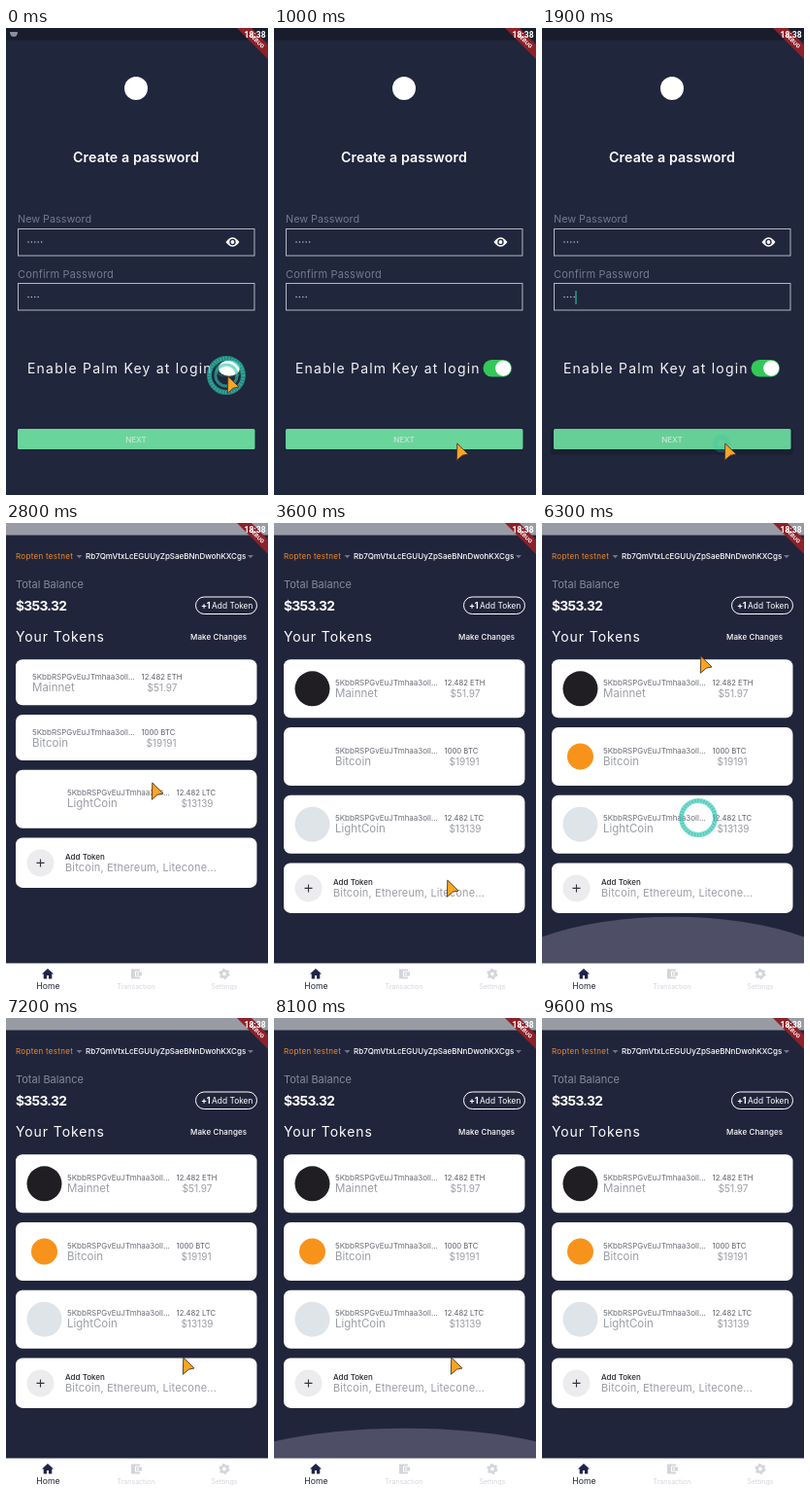
Write an HTML page that moves like this. It is 270 by 480 pixels and loops after 10000 ms.

```html
<!DOCTYPE html>
<html lang="en">
<head>
<meta charset="utf-8">
<title>Wallet demo</title>
<style>
html, body { margin: 0; width: 100%; height: 100%; overflow: hidden; background: #20253b; }
svg { display: block; width: 100vw; height: 100vh; }
text { font-family: Inter, "Open Sans", sans-serif; white-space: pre; }
</style>
</head>
<body>
<svg id="stage" viewBox="0 0 270 480"></svg>
<script>
const LOOP = 10000, STEP = 100;
const GREY = '#9c9ea6', INK = '#24283b', PALE = '#d3d5db';
const stage = document.getElementById('stage');

const text = (x, y, size, fill, str, extra = '') =>
  `<text x="${x}" y="${y}" font-size="${size}" fill="${fill}" ${extra}>${str}</text>`;
const rect = (x, y, w, h, fill, extra = '') =>
  `<rect x="${x}" y="${y}" width="${w}" height="${h}" fill="${fill}" ${extra}/>`;
const circle = (x, y, r, fill, extra = '') =>
  `<circle cx="${x}" cy="${y}" r="${r}" fill="${fill}" ${extra}/>`;
const path = (d, fill, extra = '') => `<path d="${d}" fill="${fill}" ${extra}/>`;
const dots = (n, y) =>
  Array.from({ length: n }, (_, i) => circle(23 + i * 3.4, y, .75, '#c3c6cf')).join('');
const field = y => rect(12.5, y + .5, 243.5, 27.5, 'none', 'stroke="#b4b8c3"');
const middle = 'text-anchor="middle" ';
const spacing = n => `letter-spacing="${n}" `;
const weight = n => `font-weight="${n}" `;

const loginPage = `
  ${rect(0, 0, 270, 480, '#20263c')}
  ${circle(134, 62, 12, '#fff')}
  ${text(134, 138, 14.2, '#fff', 'Create a password', middle + weight(600) + spacing(.1))}
  ${text(12, 200, 10.8, '#747990', 'New Password')}
  ${text(12, 257, 11, '#747990', 'Confirm Password', spacing(.2))}
  ${field(206)}${field(262)}${dots(5, 220)}${dots(4, 276.5)}
  ${path('M226.5 220Q233.5 210.5 240.5 220Q233.5 229.5 226.5 220Z', '#fff')}
  ${circle(233.5, 220, 3.2, '#20263c')}${circle(233.5, 220, 1.9, '#fff')}
  ${rect(34.3, 270, 1.4, 14, '#1fa890', 'id="caret"')}
  ${text(22, 355, 14, '#f4f5f8', 'Enable Palm Key at login', spacing(1.2))}
  ${rect(215.5, 341, 29.5, 17.5, '#34c759', 'rx="8.75" id="track"')}
  <ellipse id="thumb" cy="349.7" ry="8" fill="#fff"/>
  ${rect(9, 412, 250, 27, '#181d30', 'rx="3" id="shadow" opacity=".55"')}
  ${rect(12, 412, 244.5, 21, '#69d59b', 'rx="1.5" id="button"')}
  ${text(134, 425.7, 8, '#c3e3d1', 'NEXT', middle + weight(600))}`;

const tokens = [
  { name: 'Mainnet', amount: '12.482 ETH', value: '$51.97', mid: 196, r: 18, color: '#201e22', grows: 2900, icon: 3200 },
  { name: 'Bitcoin', amount: '1000 BTC', value: '$19191', mid: 195, r: 13.5, color: '#f7931a', grows: 3200, icon: 6000 },
  { name: 'LightCoin', amount: '12.482 LTC', value: '$13139', mid: 196, r: 18, color: '#dfe4e8', grows: 2600, icon: 3400 }
];

const tokenCard = (token, i) => `
  <g id="card${i}">
    ${rect(10, 0, 248.5, 47, '#fff', `rx="7" id="face${i}"`)}
    ${circle(39.5, 30, token.r, token.color, `id="icon${i}"`)}
    <g id="label${i}">
      ${text(27, 20.5, 8, '#6a6c75', '5KbbRSPGvEuJTmhaa3oll...')}
      ${text(27, 32.5, 11.5, GREY, token.name)}
      ${text(139.5, 20.5, 7.7, '#5a5c66', token.amount)}
      ${text(token.mid - 35, 32.5, 10, GREY, token.value, middle)}
    </g>
  </g>`;

const arrow = x => path(`M${x - 3} 33h6l-3 3.2z`, '#70758a');

const walletPage = `
  ${rect(0, 0, 270, 480, '#20253b')}
  ${text(10, 37, 8, '#ee8b2c', 'Ropten testnet', spacing(.3))}
  ${text(82, 37, 8, '#fff', 'Rb7QmVtxLcEGUUyZpSaeBNnDwohKXCgs', weight(500))}
  ${arrow(75.5)}${arrow(252)}
  ${text(10, 66.5, 11, '#858a9d', 'Total Balance')}
  ${text(10, 90, 13.8, '#fff', '$353.32', weight(700) + spacing(-.7))}
  ${rect(195.5, 76, 63, 17.5, 'none', 'rx="8.75" stroke="#fff"')}
  ${text(201, 88, 9, '#fff', '+1', weight(700) + spacing(-.3))}
  ${text(212, 88, 8.4, '#fff', 'Add Token')}
  ${text(10, 122, 14, '#fff', 'Your Tokens', spacing(.9))}
  ${text(190, 120, 8, '#fff', 'Make Changes', weight(500) + spacing(.1))}
  ${tokens.map(tokenCard).join('')}
  <g id="add">
    ${rect(10, 0, 248.5, 51.5, '#fff', 'rx="7"')}
    ${circle(35.5, 26, 14, '#ececee')}
    ${path('M31.5 26h8M35.5 22v8', 'none', 'stroke="#33343c" stroke-width="1.1"')}
    ${text(61, 22.5, 8, '#24262e', 'Add Token', weight(500))}
    ${text(61, 34.7, 11, GREY, 'Bitcoin, Ethereum, Litecone...', spacing(.15))}
  </g>
  <path id="glow" fill="#4e4f66"/>
  ${rect(0, 452.5, 270, 27.5, '#fff')}
  ${path('M43 458l6 5.5h-1.7v5h-3.3v-3.5h-2v3.5h-3.3v-5H37z', '#20244a')}
  ${text(43.5, 478.7, 8.7, INK, 'Home', middle)}
  ${path('M129 458.5h9v2h-5v6h5v2h-9zM134 461.5h6v4h-6z', PALE)}
  ${circle(136, 463.5, .9, '#fff')}
  ${text(134, 478.7, 7, PALE, 'Transaction', middle)}
  ${circle(225, 463.5, 3.2, 'none', `stroke="${PALE}" stroke-width="2.6"`)}
  ${circle(225, 463.5, 4.8, 'none', `stroke="${PALE}" stroke-width="1.6" stroke-dasharray="2.5 2.526"`)}
  ${text(225, 478.7, 7, PALE, 'Settings', middle)}`;

stage.innerHTML = `
  <g id="login">${loginPage}</g>
  <g id="wallet">${walletPage}</g>
  ${rect(0, 0, 270, 12.5, '#181c2d', 'id="status"')}
  ${path('M4 4h8q0 5-4 5t-4-5z', '#8b8f9b', 'id="notice"')}
  ${path('M238 0h15l17 17v15z', '#8d2029')}
  ${text(0, 2, 5.5, '#fff', 'DEBUG', `${middle} ${weight(700)} transform="translate(258.5 13) rotate(45)"`)}
  ${text(245.5, 9.7, 8.6, '#fff', '18:38', weight(600) + ' style="font-family:Roboto,sans-serif"')}
  <g id="ripple" fill="none" stroke="#2cc4b0">
    <circle id="halo" stroke-width="5" opacity=".6"/>
    <circle id="ring" stroke-width="3.5" stroke-dasharray="1.5 1.5" opacity=".6"/>
    <circle id="core" stroke-width="3" opacity=".6"/>
  </g>
  <path id="cursor" d="M.8 0L12 11 6.3 12.2 .3 17.3Z" fill="#fba524" stroke="#4a3622" stroke-width=".9" stroke-linejoin="round"/>`;

const parts = {};
stage.querySelectorAll('[id]').forEach(node => parts[node.id] = node);
const set = (id, attrs) => {
  for (const key in attrs) parts[id].setAttribute(key, attrs[key]);
};
const show = (id, on) => { parts[id].style.display = on ? '' : 'none'; };
const move = (id, x, y) => set(id, { transform: `translate(${x} ${y})` });

const cursorKeys = [
  [0, 228, 358], [800, 188, 427], [2500, 188, 427], [2800, 150, 267],
  [3100, 150, 267], [3600, 178, 367], [5300, 178, 367], [5600, 162, 304],
  [6000, 162, 304], [6300, 163, 137], [6800, 163, 137], [7000, 182, 349],
  [8100, 182, 349], [8400, 182, 142], [8700, 182, 142], [9100, 166, 473],
  [9200, 166, 473], [9300, 166, 490]
];
const glowKeys = [
  [6000, 0], [6300, 48], [6700, 0], [7900, 0], [8100, 31], [8300, 46], [8700, 0]
];
const clicks = [
  [-300, 227, 357], [1800, 185, 427], [6000, 161, 303], [7600, 182, 349]
];

// Smoothly interpolates rows of [time, ...values].
function sample(keys, t) {
  const next = keys.findIndex(key => key[0] > t);
  if (next === 0) return keys[0].slice(1);
  if (next < 0) return keys[keys.length - 1].slice(1);
  const a = keys[next - 1], b = keys[next];
  const p = (t - a[0]) / (b[0] - a[0]), eased = p * p * (3 - 2 * p);
  return a.slice(1).map((v, i) => v + (b[i + 1] - v) * eased);
}

function drawLogin(t) {
  const on = Math.min(1, t / 300);
  show('caret', Math.floor(t / 500) % 2);
  show('notice', t < 1000);
  set('status', { fill: '#181c2d' });
  set('track', { opacity: .25 + .75 * on });
  set('thumb', { cx: 230 + 6.2 * on, rx: 11 - 3 * on });
  set('button', { fill: t >= 1800 ? '#66cf97' : '#69d59b' });
  show('shadow', t >= 1800);
}

function drawWallet(t) {
  show('notice', false);
  set('status', { fill: '#999ba4' });
  let y = 140.3;
  tokens.forEach((token, i) => {
    const grown = t >= token.grows, height = grown ? 60 : 47;
    move('card' + i, 0, y);
    move('label' + i, grown ? 36 : 0, grown ? 6 : 0);
    set('face' + i, { height });
    show('icon' + i, t >= token.icon);
    y += height + 9.7;
  });
  move('add', 0, y);
  const [height] = sample(glowKeys, t), edge = 452.5 - .56 * height;
  set('glow', { d: `M0 452.5V${edge}A202 ${1.7 * height} 0 0 1 270 ${edge}V452.5Z` });
  show('glow', height > 0);
}

function drawPointer(t) {
  move('cursor', ...sample(cursorKeys, t));
  const click = clicks.find(([start]) => t >= start && t < start + 500);
  show('ripple', click);
  if (!click) return;
  const p = (t - click[0]) / 500, r = 22 * (1 - (1 - p) ** 2);
  move('ripple', click[1], click[2]);
  set('ripple', { opacity: Math.min(1, p * 1.7, (1 - p) * 3) });
  set('halo', { r: Math.max(0, r - 1) });
  set('ring', { r: Math.max(0, r - 1) });
  set('core', { r: r * .6 });
  show('core', t < 2000);
}

function draw(time) {
  let t = Math.floor(time % LOOP / STEP) * STEP;
  // The picture stalls while the wallet page loads.
  if (t >= 2000 && t < 2400) t = 2000;
  const login = t < 2000;
  show('login', login);
  show('wallet', !login);
  (login ? drawLogin : drawWallet)(t);
  drawPointer(t);
}

const begin = performance.now();
function tick() {
  draw(performance.now() - begin);
  requestAnimationFrame(tick);
}
tick();
</script>
</body>
</html>
```
